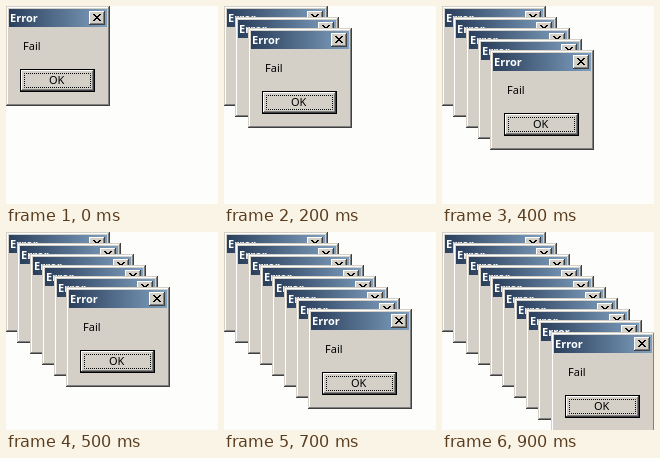
Write an HTML page with a canvas that moves like this. It is 212 px wide and 198 px high and loops after 1 s.

```html
<!DOCTYPE html>
<html>
<head>
<meta charset="utf-8">
<style>
html, body { margin: 0; width: 100%; height: 100%; overflow: hidden; background: #fdfefb; }
canvas { display: block; }
</style>
</head>
<body>
<canvas id="stage" width="212" height="198"></canvas>
<script>
const ctx = document.getElementById('stage').getContext('2d');
const FACE = '#d4d0c8', SHADE = '#808080', DARK = '#404040';

function rect(color, x, y, w, h) {
  ctx.fillStyle = color;
  ctx.fillRect(x, y, w, h);
}

// One-pixel edge, lit from the top left
function edge(light, dark, x, y, w, h) {
  rect(light, x, y, w - 1, 1);
  rect(light, x, y, 1, h - 1);
  rect(dark, x, y + h - 1, w, 1);
  rect(dark, x + w - 1, y, 1, h);
}

function raised(x, y, w, h) {
  rect(FACE, x, y, w, h);
  edge('#fff', DARK, x, y, w, h);
  edge(FACE, SHADE, x + 1, y + 1, w - 2, h - 2);
}

function label(text, x, y, color, weight = 400) {
  ctx.font = `${weight} 11px "Noto Sans", "Open Sans", sans-serif`;
  ctx.fillStyle = color;
  ctx.fillText(text, x, y);
}

function dialog(x, y) {
  ctx.save();
  ctx.translate(x, y);
  rect(FACE, 0, 0, 104, 100);
  edge(FACE, DARK, 0, 0, 104, 100);
  edge('#fff', SHADE, 1, 1, 102, 98);

  const bar = ctx.createLinearGradient(3, 0, 101, 0);
  bar.addColorStop(0, '#2a3f5c');
  bar.addColorStop(1, '#7f9fbf');
  rect(bar, 3, 3, 98, 18);
  label('Error', 4, 16, '#fff', 700);

  raised(83, 5, 16, 14);
  for (let i = 0; i < 7; i++) {
    rect('#000', 87 + i, 8 + i, 2, 1);
    rect('#000', 93 - i, 8 + i, 2, 1);
  }

  label('Fail', 17, 44, '#000');

  rect('#000', 14, 63, 75, 23);
  raised(15, 64, 73, 21);
  ctx.strokeStyle = '#000';
  ctx.setLineDash([1, 1]);
  ctx.lineDashOffset = 0.5;
  ctx.strokeRect(18.5, 67.5, 66, 14);
  label('OK', 43, 78, '#000');
  ctx.restore();
}

function draw(now) {
  const last = Math.floor(now % 1000 / 100);
  rect('#fdfefb', 0, 0, 212, 198);
  for (let i = 0; i <= last; i++) {
    dialog(Math.max(0, Math.round(i * 12.14 - 0.7)), Math.round(i * 11.06));
  }
  requestAnimationFrame(draw);
}
requestAnimationFrame(draw);
</script>
</body>
</html>
```
